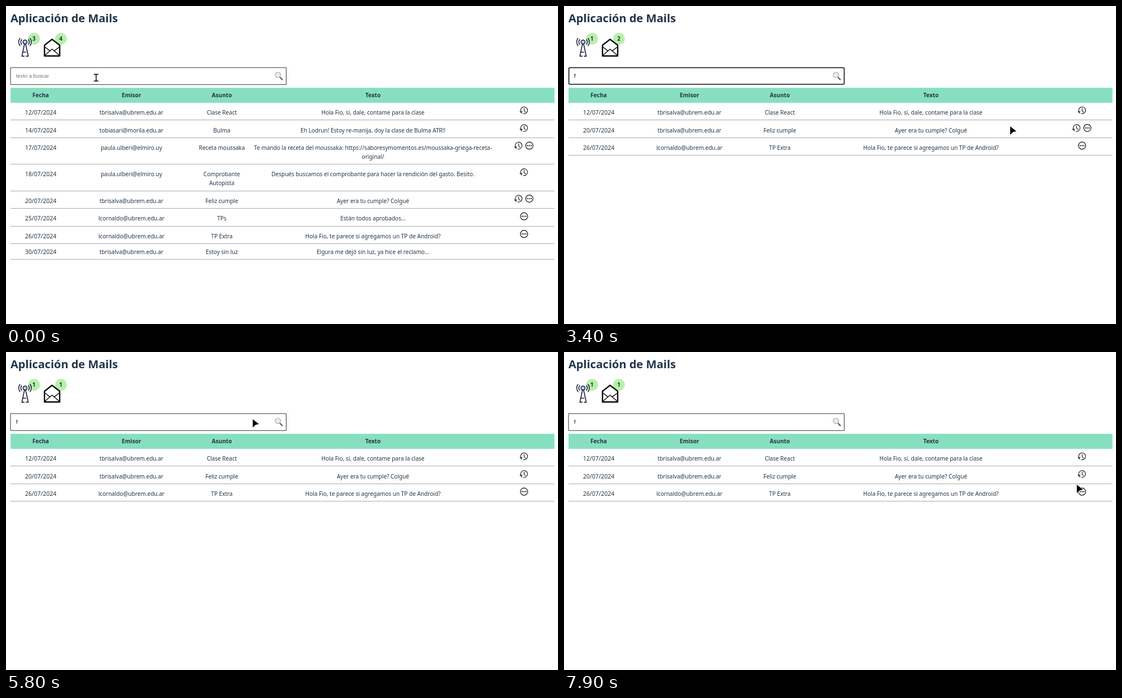
An HTML page with a canvas that plays this animation: 986x568 px, repeating every 8 s.

```html
<!DOCTYPE html>
<html lang="es">
<head>
<meta charset="utf-8">
<title>Aplicación de Mails</title>
<style>
  html, body { margin: 0; width: 100%; height: 100%; overflow: hidden; background: #fff; }
  canvas { display: block; width: 986px; height: 568px; }
</style>
</head>
<body>
<canvas id="stage"></canvas>
<script>
const W = 986, H = 568, LOOP = 8000;
const canvas = document.getElementById('stage');
const ctx = canvas.getContext('2d');
const dpr = window.devicePixelRatio || 1;
canvas.width = W * dpr;
canvas.height = H * dpr;

const SANS = '"Noto Sans", "Open Sans", sans-serif';
const FORM = '"Liberation Sans", Arial, sans-serif';
const INK = '#213547', MINT = '#88dfc0', EDGE = '#80e9c8', BADGE = '#b8f0ac';
const COLS = [62, 224, 385.5, 655.5];
const HEADS = ['Fecha', 'Emisor', 'Asunto', 'Texto'];

// Times of the state changes
const FOCUS = 800, TYPE = 1500, BLUR = 5200, READ = 5300;
const POINTER = 3100, HAND = 3900;

const mail = (date, from, subject, text, seen, unread) => ({ date, from, subject, text, seen, unread });
const TEACHER = 'tbrisalva@ubrem.edu.ar', AIDE = 'lcornaldo@ubrem.edu.ar', FRIEND = 'paula.ulberi@elmiro.uy';
const MAILS = [
  mail('12/07/2024', TEACHER, 'Clase React', 'Hola Fio, sí, dale, contame para la clase', true, false),
  mail('14/07/2024', 'tobiasari@morila.edu.ar', 'Bulma', 'Eh Lodrun! Estoy re-manija, doy la clase de Bulma ATR!!', true, false),
  mail('17/07/2024', FRIEND, 'Receta moussaka',
    'Te mando la receta del moussaka: https://saboresymomentos.es/moussaka-griega-receta-\noriginal/', true, true),
  mail('18/07/2024', FRIEND, 'Comprobante\nAutopista',
    'Después buscamos el comprobante para hacer la rendición del gasto. Besito.', true, false),
  mail('20/07/2024', TEACHER, 'Feliz cumple', 'Ayer era tu cumple? Colgué', true, true),
  mail('25/07/2024', AIDE, 'TPs', 'Están todos aprobados...', false, true),
  mail('26/07/2024', AIDE, 'TP Extra', 'Hola Fio, te parece si agregamos un TP de Android?', false, true),
  mail('30/07/2024', TEACHER, 'Estoy sin luz', 'Elgura me dejó sin luz, ya hice el reclamo...', false, false)
];
const CLICKED = MAILS[4];

// Pointer moves: first step, last step, target x, target y
const MOVES = [
  [100, 100, 161, 131], [3100, 3200, 600, 184], [3400, 3400, 797, 215],
  [3500, 4100, 935, 217], [5500, 6100, 120, 57], [6300, 6400, 106, 55],
  [6500, 6600, 102, 55], [6900, 7100, 91, 56], [7300, 7900, 916, 237]
];

function write(str, x, y, font, color = INK, align = 'left') {
  ctx.font = font;
  ctx.fillStyle = color;
  ctx.textAlign = align;
  ctx.fillText(str, x, y);
}

function line(points, close) {
  ctx.beginPath();
  points.forEach(([x, y]) => ctx.lineTo(x, y));
  if (close) ctx.closePath();
  ctx.stroke();
}

function arc(x, y, r, from = 0, to = 2 * Math.PI, back = false) {
  ctx.beginPath();
  ctx.arc(x, y, r, from, to, back);
}

function disc(x, y, r, color) {
  arc(x, y, r);
  ctx.fillStyle = color;
  ctx.fill();
}

function pen(color, width) {
  ctx.strokeStyle = color;
  ctx.lineWidth = width;
}

function drawAntenna() {
  pen('#1c1c3c', 1.6);
  arc(34, 64.3, 3.6);
  ctx.fillStyle = '#a9d3ea';
  ctx.fill();
  ctx.stroke();
  for (const r of [7.4, 11.2]) {
    arc(34, 64.3, r, -0.62, 0.62);
    ctx.stroke();
    arc(34, 64.3, r, Math.PI - 0.62, Math.PI + 0.62);
    ctx.stroke();
  }
  line([[33, 68], [28.4, 89.6], [32.5, 89.6]]);
  line([[35, 68], [39.8, 89.6], [36, 89.6]]);
  line([[30, 82.5], [35.5, 82.5]]);
}

function drawEnvelope() {
  pen('#0b0b0b', 2.4);
  line([[68.8, 70], [82.3, 59.5], [95.9, 70], [95.9, 89.2], [68.8, 89.2]], true);
  pen('#0b0b0b', 1.5);
  line([[69, 73], [78.5, 80.2]]);
  line([[95.7, 73], [86.1, 80.2]]);
  line([[69.5, 88], [82.3, 77], [95.2, 88]]);
}

function drawBadge(x, count) {
  write(String(count), x, 61.7, `bold 10.1px ${SANS}`, INK, 'center');
}

function drawSearch(focused, typed, caret) {
  if (focused) {
    pen('#101010', 1.6);
    ctx.beginPath();
    ctx.roundRect(8.7, 110.3, 491.8, 29.5, 1.5);
    ctx.stroke();
  } else {
    pen('#333', 1);
    ctx.strokeRect(8.5, 110, 492, 30.3);
  }
  write(typed || 'texto a buscar', 18, 128, `9.4px ${FORM}`, typed ? '#000' : '#757575');
  if (caret) {
    ctx.fillStyle = '#222';
    ctx.fillRect(typed ? 20 : 18, 119, 1, 11);
  }
  pen('#5c5858', 2.2);
  line([[489.8, 127.8], [493.4, 131.4]]);
  arc(485.7, 123, 4.8);
  ctx.fillStyle = '#e4eef3';
  ctx.fill();
  pen('#9aa0a3', 1.1);
  ctx.stroke();
}

function drawHistory(x, y) {
  pen('#111', 1.1);
  arc(x + 0.2, y, 6.1, 1.75, 2.75, true);
  ctx.stroke();
  line([[x - 7.2, y + 2.2], [x - 5.3, y + 3.6], [x - 3.4, y + 1.9]]);
  line([[x - 5, y + 3.8], [x - 3.7, y + 5.2]]);
  line([[x + 0.2, y - 3.6], [x + 0.2, y + 0.5], [x + 2.8, y + 3]]);
}

function drawDots(x, y) {
  pen('#111', 1.2);
  arc(x, y, 6.5);
  ctx.stroke();
  for (const dx of [-3.2, 0, 3.2]) disc(x + dx, y, 1.1, '#111');
}

function drawTable(mails, isUnread) {
  ctx.fillStyle = MINT;
  ctx.fillRect(8, 146, 971.5, 27);
  ctx.lineJoin = 'miter';
  pen(EDGE, 1);
  ctx.strokeRect(8.5, 146.5, 970.5, 26);
  ctx.lineJoin = 'round';
  HEADS.forEach((head, i) => write(head, COLS[i], 163.4, `bold 10.1px ${SANS}`, INK, 'center'));
  let top = 172.8;
  for (const m of mails) {
    const unread = isUnread(m), icons = m.seen || unread;
    const cells = [m.date, m.from, m.subject, m.text].map(s => s.split('\n'));
    const lines = Math.max(...cells.map(c => c.length));
    const base = top + (icons ? 21.2 : 17.7);
    cells.forEach((cell, i) => cell.forEach((str, n) =>
      write(str, COLS[i], base + n * 15.8, `${i ? 10.05 : 10.5}px ${SANS}`, INK, 'center')));
    const both = m.seen && unread, y = top + 13.5;
    if (m.seen) drawHistory(both ? 915.5 : 925.3, y);
    if (unread) drawDots(both ? 934.8 : 925.4, y);
    top += (icons ? 31.55 : 27.6) + (lines - 1) * 15.8;
    ctx.fillStyle = '#aaa';
    ctx.fillRect(8, Math.round(top) - 1, 971.5, 1);
  }
}

function pointerAt(t) {
  let x = 161, y = 128;
  for (const [start, end, tx, ty] of MOVES) {
    if (t < start) break;
    const steps = (end - start) / 100 + 1;
    const p = Math.min(1, (Math.floor((t - start) / 100) + 1) / steps);
    const k = p * p * (3 - 2 * p);
    x += (tx - x) * k;
    y += (ty - y) * k;
  }
  return [x, y];
}

function drawShape(path) {
  const shape = new Path2D(path);
  pen('#fff', 1.2);
  ctx.stroke(shape);
  ctx.fillStyle = '#000';
  ctx.fill(shape);
}

function drawPointer(t) {
  const [x, y] = pointerAt(t);
  ctx.save();
  ctx.translate(x, y);
  if (t < POINTER) {
    pen('#000', 1.5);
    line([[-3.5, -6], [-1, -6], [0, -5.2], [1, -6], [3.5, -6]]);
    line([[0, -5.5], [0, 5.5]]);
    line([[-3.5, 6], [-1, 6], [0, 5.2], [1, 6], [3.5, 6]]);
  } else if (t >= HAND && t < READ) {
    drawShape('M-1.8 1Q0-.8 1.5 1L1.7 5 7 6Q9 6.4 9 8.5L7.5 12V15H-.3V12.5L-4 8.5Q-3.6 6.6-1.5 8Z');
  } else {
    drawShape('M0 0 11 8.7 5.2 10 0 15Z');
  }
  ctx.restore();
}

function caretOn(t) {
  if (t < FOCUS || t >= BLUR) return false;
  if (t < TYPE) return t < 1400;
  return t < 2100 || (t >= 2700 && t < 3400) || (t >= 4000 && t < 4600);
}

function draw(t) {
  ctx.setTransform(dpr, 0, 0, dpr, 0, 0);
  ctx.fillStyle = '#fff';
  ctx.fillRect(0, 0, W, H);
  ctx.lineCap = ctx.lineJoin = 'round';

  const typed = t >= TYPE ? 'f' : '';
  const mails = MAILS.filter(m => [m.from, m.subject, m.text].join(' ').toLowerCase().includes(typed));
  const isUnread = m => m.unread && !(m === CLICKED && t >= READ);

  write('Aplicación de Mails', 8, 29.3, `bold 20.1px ${SANS}`);
  disc(50.2, 58.6, 10.6, BADGE);
  disc(98.2, 58.6, 10.6, BADGE);
  drawAntenna();
  drawEnvelope();
  drawBadge(50, mails.filter(m => !m.seen).length);
  drawBadge(98, mails.filter(isUnread).length);
  drawSearch(t >= FOCUS && t < BLUR, typed, caretOn(t));
  drawTable(mails, isUnread);
  drawPointer(t);
}

const began = performance.now();
function tick() {
  draw((performance.now() - began) % LOOP);
  requestAnimationFrame(tick);
}
tick();
</script>
</body>
</html>
```
